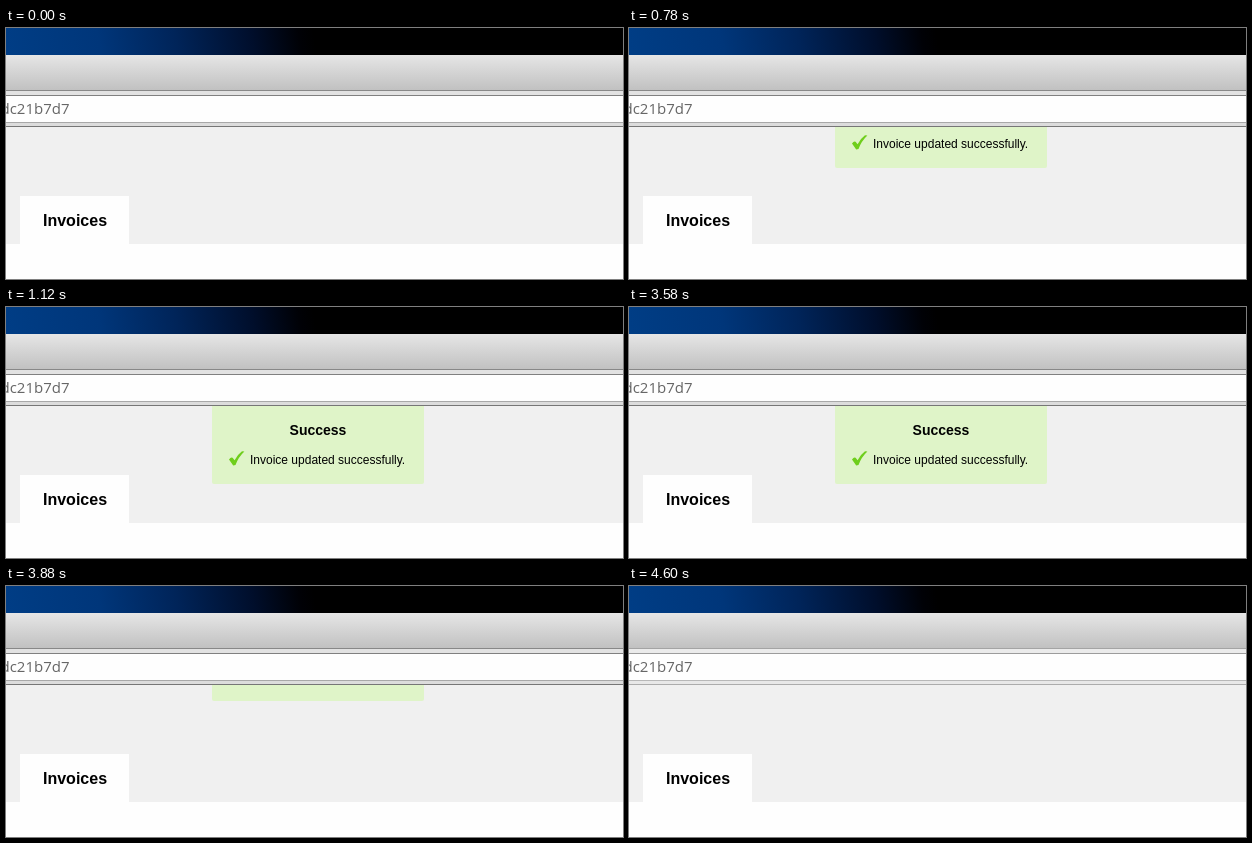
Write an HTML page with a canvas that moves like this. It is 617 px wide and 251 px high and loops after 4680 ms.

```html
<!DOCTYPE html>
<html lang="en">
<head>
<meta charset="utf-8">
<title>Invoice notice</title>
<style>
html, body { margin: 0; width: 100%; height: 100%; overflow: hidden; background: #fff; }
canvas { display: block; }
</style>
</head>
<body>
<canvas id="stage" width="617" height="251"></canvas>
<script>
const W = 617, LOOP = 4680, PAGE_TOP = 99, BANNER_H = 78;
const SANS = '"Liberation Sans", Arial, sans-serif';
const ctx = document.getElementById('stage').getContext('2d');

// Times at which the sliding banner takes a new position
const STEPS = [660, 720, 770, 830, 890, 940, 1000, 1060, 1120];
for (let t = 3580; t <= 4120; t += 60) STEPS.push(t);

// cubic-bezier(.25, .1, .25, 1), solved by bisection
function ease(p) {
  if (p <= 0) return 0;
  if (p >= 1) return 1;
  const curve = (u, a, b) => 3 * (1 - u) * (1 - u) * u * a + 3 * (1 - u) * u * u * b + u * u * u;
  let lo = 0, hi = 1;
  for (let i = 0; i < 30; i++) {
    const mid = (lo + hi) / 2;
    if (curve(mid, 0.25, 0.25) < p) lo = mid; else hi = mid;
  }
  return curve(lo, 0.1, 1);
}

function shownHeight(time) {
  let t = 0;
  for (const s of STEPS) if (s <= time) t = s;
  const shown = ease((t - 628) / 465) - ease((t - 3634) / 500);
  return Math.round(BANNER_H * shown);
}

function rect(x, y, w, h, color) {
  ctx.fillStyle = color;
  ctx.fillRect(x, y, w, h);
}

function text(str, x, y, font, color = '#000', align = 'left') {
  ctx.font = font;
  ctx.fillStyle = color;
  ctx.textAlign = align;
  ctx.fillText(str, x, y);
}

function gradient(x0, y0, x1, y1, stops) {
  const g = ctx.createLinearGradient(x0, y0, x1, y1);
  for (const [at, color] of stops) g.addColorStop(at, color);
  return g;
}

function drawBrowser(active) {
  rect(0, 0, W, 27, gradient(0, 10, 300, -40, [
    [0, '#003d85'], [0.3, '#00367a'], [0.55, '#002459'],
    [0.8, '#000e2b'], [0.95, '#000106'], [1, '#000']
  ]));
  rect(0, 27, W, 35, gradient(0, 27, 0, 62, [[0, '#e6e6e6'], [1, '#c1c1c1']]));
  rect(0, 62, W, 1, active ? '#888' : '#a4a4a4');
  rect(0, 63, W, 4, active ? '#e2e2e2' : '#ebebeb');
  rect(0, 67, W, 1, active ? '#808080' : '#9c9c9c');
  rect(0, 68, W, 26, '#fefefe');
  rect(0, 94, W, 1, active ? '#a8a8a8' : '#b8b8b8');
  rect(0, 95, W, 3, active ? '#dcdcdc' : '#e8e8e8');
  rect(0, 98, W, 1, active ? '#767676' : '#acacac');
  text('dc21b7d7', 63.5, 86, '15px "Open Sans", "Noto Sans", sans-serif', '#666', 'right');
}

function drawPage() {
  rect(0, PAGE_TOP, W, 117, '#f0f0f0');
  rect(0, 216, W, 35, '#fefefe');
  rect(14, 168, 109, 48, '#fefefe');
  text('Invoices', 37, 198, 'bold 16px ' + SANS);
}

function drawCheck() {
  ctx.fillStyle = '#6fce1c';
  ctx.beginPath();
  ctx.moveTo(223, 152.5);
  ctx.quadraticCurveTo(225, 149.6, 226.6, 150.8);
  ctx.lineTo(228.6, 153.2);
  ctx.quadraticCurveTo(232, 147, 236, 144.2);
  ctx.lineTo(238.4, 144.6);
  ctx.quadraticCurveTo(232.5, 150, 229.5, 158);
  ctx.lineTo(227.2, 158.4);
  ctx.closePath();
  ctx.fill();
}

function drawBanner(shown) {
  if (shown <= 0) return;
  ctx.save();
  ctx.beginPath();
  ctx.rect(0, PAGE_TOP, W, 152);
  ctx.clip();
  ctx.translate(0, shown - BANNER_H);
  ctx.fillStyle = '#dff4c8';
  ctx.beginPath();
  ctx.roundRect(206, PAGE_TOP, 212, BANNER_H, [0, 0, 2, 2]);
  ctx.fill();
  text('Success', 312, 128, 'bold 14px ' + SANS, '#000', 'center');
  drawCheck();
  text('Invoice updated successfully.', 244, 157, '12px ' + SANS);
  ctx.restore();
}

function draw(now) {
  const time = now % LOOP;
  drawBrowser(time < 4600);
  drawPage();
  drawBanner(shownHeight(time));
}

const start = performance.now();
function tick() {
  draw(performance.now() - start);
  requestAnimationFrame(tick);
}
tick();
</script>
</body>
</html>
```
